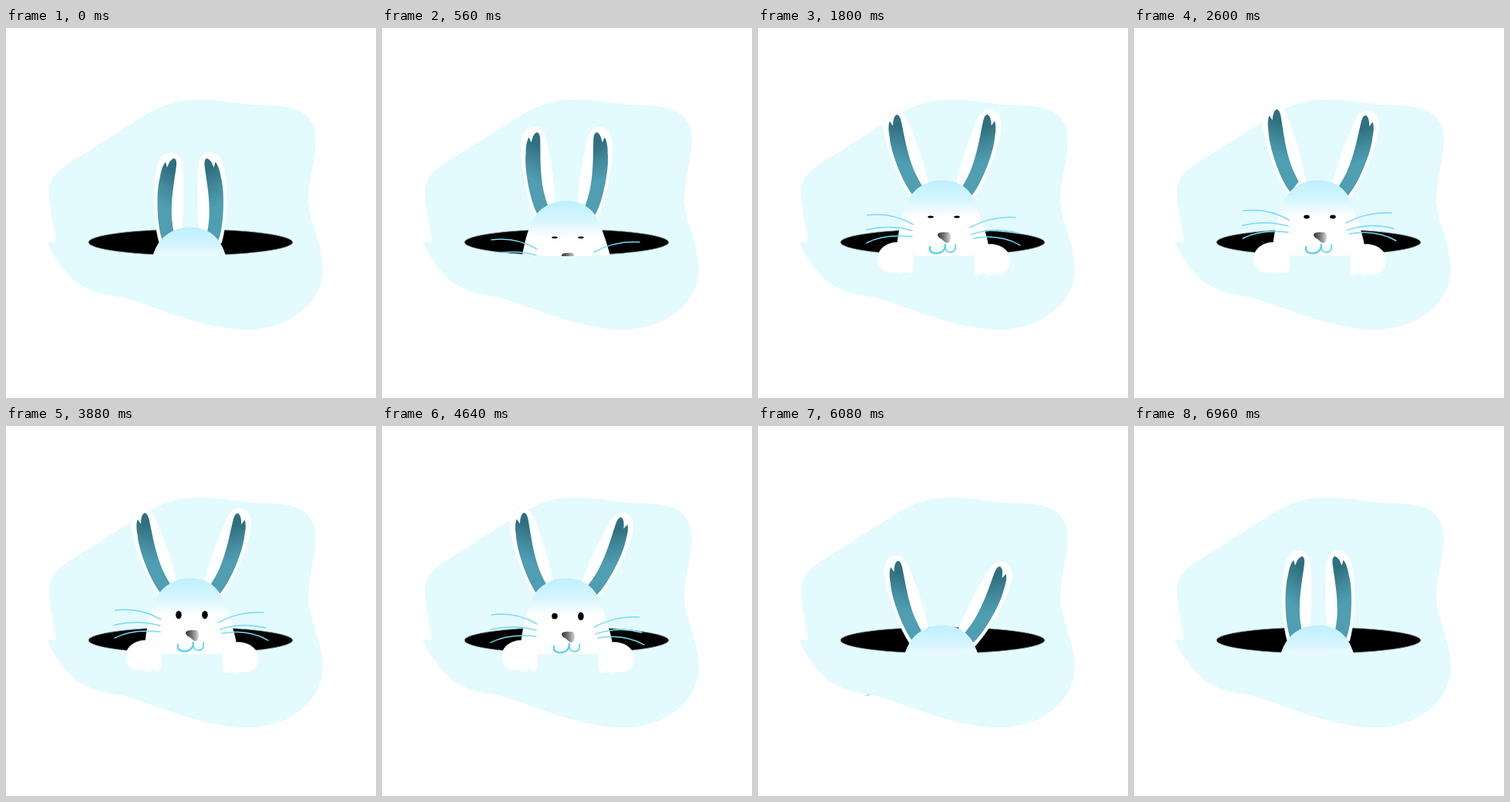
Recreate the animation shown at these times as an HTML page with a canvas. Size 480 by 480 pixels, loop 7000 ms.

```html
<!DOCTYPE html>
<html lang="en">
<head>
<meta charset="utf-8">
<title>Rabbit in a hole</title>
<style>
html, body { margin: 0; width: 100%; height: 100%; overflow: hidden; background: #fff; }
canvas { display: block; width: 480px; height: 480px; }
</style>
</head>
<body>
<canvas id="stage" width="480" height="480"></canvas>
<script>
const ctx = document.getElementById('stage').getContext('2d');
const LOOP = 7000;
const ICE = '#e3faff';
const MID = 239.3; // mirror axis of the ears

const blob = new Path2D('M65 278C63 256 55 232 56 211C57 195 65 186 84 174L176 116C206 98 222 93 255 93C280 93 300 98 325 100C355 100 380 102 392 116C402 128 403 143 401 158C398 184 392 205 392 222C393 254 412 280 411 318C406 362 362 391 313 391C260 391 205 366 155 350C134 346 106 343 87 326C70 309 61 294 53 277Z');
const front = new Path2D('M0 278H106A133 18 0 0 0 373 278H480V480H0Z');
const head = new Path2D('M179 300C180 272 185 249 191.500 231C200 208 218 197.500 239 197.500C261 197.500 277 209 284 231C291 250 298 272 300 288V300Z');
const ear = new Path2D('M199 218C192 195 190 150 194 128C196 110 203 100 215 100C226 101 230 112 230 130C231 160 231 185 226 215Z');
const inner = new Path2D('M204 216C196 202 194 152 200 132C201 124 204 116 207 113L209 120Q213 109 218 108Q222 109 221 118C218 140 214 160 215 185Q216 197 218 206Z');
const nose = new Path2D('M233 269C233 265 238 265 243 265H247Q250 266 250 272Q249 279 246 279C242 279 240 274 235 272Z');
const smileLeft = new Path2D('M223 284C221 293 233 294 239 290Q243 287 243 281');
const smileRight = new Path2D('M243 285C243 293 259 294 256 281');
const paw = new Path2D('M155 299C156 286 167 278 182 278Q202 278 202 292V313Q201 318 196 318Q192 318 190 315Q188 319 183 319Q178 319 177 316C170 320 155 315 155 299Z');
const whiskers = new Path2D('M142 237Q174 233 201 249M141 256Q172 249 200 257M141 273Q164 261 200 265M275 253Q303 238 334 240M277 262Q306 252 337 260M280 267Q314 261 340 276');

// 0 before a, 1 after b, linear between
const ramp = (t, a, b) => Math.min(1, Math.max(0, (t - a) / (b - a)));
// One smooth hump around a moment
const hump = (t, mid, half) => Math.cos(Math.PI / 2 * Math.min(1, Math.abs(t - mid) / half)) ** 2;

function pose(t) {
  const up = ramp(t, 0, 1000) - ramp(t, 4825, 5345);
  const spread = ramp(t, 0, 1080) - ramp(t, 6040, 6960);
  const droop = ramp(t, 3880, 5200) - ramp(t, 6040, 6960);
  const wake = ramp(t, 1080, 2600);
  const open = 1.3 + 4 * ramp(t, 1080, 3880) ** 2;
  const hide = ramp(t, 4800, 5240);
  return {
    sink: 61 * (1 - up),
    droop: 3 * droop,
    leftTurn: -spread * (18.5 - 1.5 * Math.cos(Math.PI * (t - 2780) / 1100)),
    leftDrop: 2 * droop - 6 * hump(t, 2750, 1000) - 6 * hump(t, 6500, 450),
    rightTurn: spread * (18 + 3 * wake + 9 * droop),
    rightDrop: 3 * droop,
    whisker: 11 * (1 - wake) + 13 * ramp(t, 3500, 5900) - 5 * ramp(t, 6080, 6960),
    leftEye: open - 2.5 * droop,
    rightEye: open,
    pawFade: ramp(t, 780, 1180) - hide,
    pawDrop: 13 * hide
  };
}

function shade(x0, y0, x1, y1, ...colors) {
  const g = ctx.createLinearGradient(x0, y0, x1, y1);
  colors.forEach((c, i) => g.addColorStop(i / (colors.length - 1), c));
  return g;
}

const headFill = shade(0, 197, 0, 246, '#bdf0ff', '#d5f5ff', '#ffffff');
const earFill = shade(224, 130, 198, 165, '#2f7080', '#42899b', '#4f9eb2');
const noseFill = shade(233, 0, 250, 0, '#333', '#777', '#d8d8d8');

function fill(path, color) {
  ctx.fillStyle = color;
  ctx.fill(path);
}

function stroke(path, color, width) {
  ctx.strokeStyle = color;
  ctx.lineWidth = width;
  ctx.stroke(path);
}

function oval(x, y, rx, ry) {
  const path = new Path2D();
  path.ellipse(x, y, rx, ry, 0, 0, Math.PI * 2);
  fill(path, '#000');
  return path;
}

function soft(path) {
  fill(path, '#fff');
  stroke(path, ICE, 0.5);
}

// The right ear is the left one mirrored
function drawEar(turn, drop, mirror) {
  ctx.save();
  ctx.translate(0, drop);
  if (mirror) {
    ctx.translate(MID * 2, 0);
    ctx.scale(-1, 1);
    turn = -turn;
  }
  ctx.translate(212, 220);
  ctx.rotate(turn * Math.PI / 180);
  ctx.translate(-212, -220);
  soft(ear);
  fill(inner, earFill);
  ctx.restore();
}

function drawRabbit(p) {
  ctx.save();
  ctx.translate(0, p.sink);
  drawEar(p.leftTurn, p.leftDrop, false);
  drawEar(p.rightTurn, p.rightDrop, true);
  fill(head, headFill);
  ctx.translate(0, p.droop);
  oval(224, 245, 3.8, p.leftEye);
  oval(258, 245, 3.8, p.rightEye);
  fill(nose, noseFill);
  stroke(smileLeft, '#55d3f5', 2.4);
  stroke(smileRight, '#55d3f5', 1.6);
  ctx.translate(0, p.whisker);
  stroke(whiskers, '#74dcf6', 1.5);
  ctx.restore();
}

function drawPaws(p) {
  ctx.save();
  ctx.globalAlpha = p.pawFade;
  ctx.translate(0, p.pawDrop);
  soft(paw);
  ctx.translate(482.5, 2.5);
  ctx.scale(-1, 1);
  soft(paw);
  ctx.restore();
}

function draw(t) {
  const p = pose(t);
  ctx.fillStyle = '#fff';
  ctx.fillRect(0, 0, 480, 480);
  fill(blob, ICE);
  stroke(oval(239.5, 278, 132.5, 17), '#8fa3aa', 0.8);
  drawRabbit(p);
  // The near ground hides whatever is below the rim
  ctx.save();
  ctx.clip(front);
  fill(blob, ICE);
  ctx.restore();
  drawPaws(p);
}

ctx.lineCap = 'round';
const start = performance.now();
function tick() {
  draw((performance.now() - start) % LOOP);
  requestAnimationFrame(tick);
}
tick();
</script>
</body>
</html>
```
